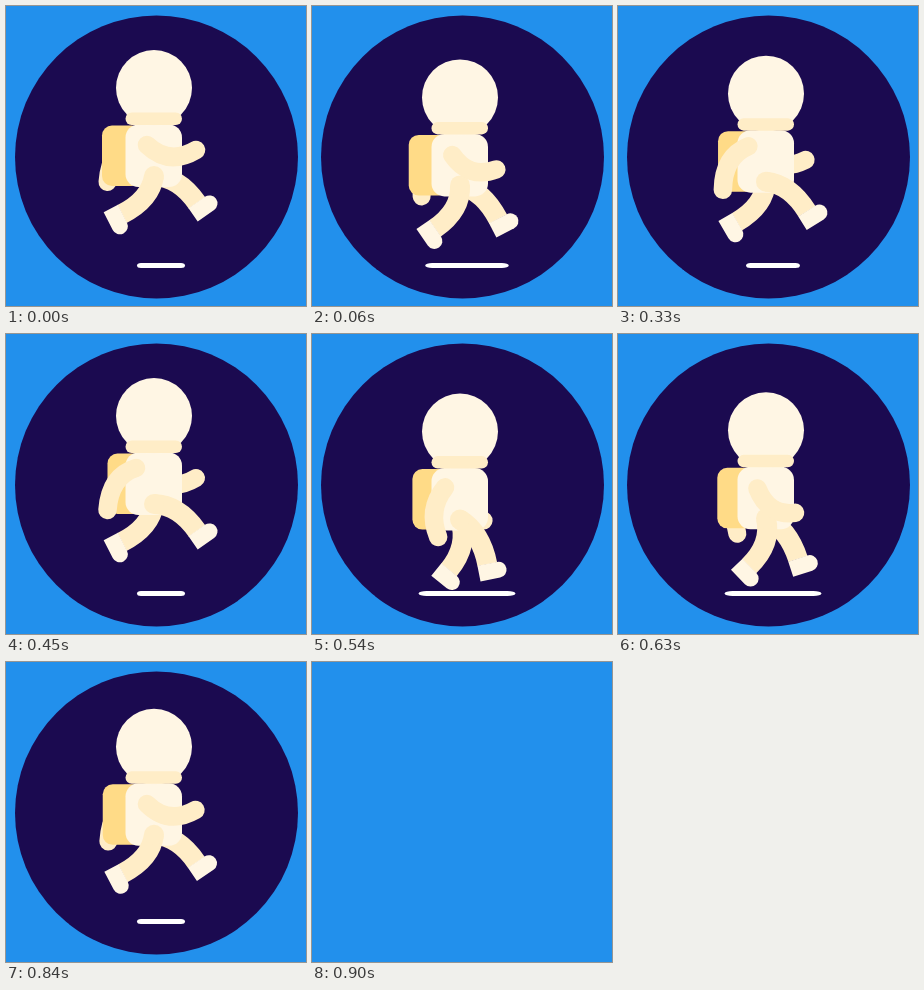
Animation, 300 px wide and 300 px high, one loop 930 ms. Source, as an HTML page:

```html
<!DOCTYPE html>
<html lang="en">
<head>
<meta charset="utf-8">
<title>Running astronaut</title>
<style>
html, body { margin: 0; width: 100%; height: 100%; overflow: hidden; background: #2290ec; }
svg { display: block; width: 100%; height: 100%; }
.limb { fill: none; stroke: #ffedc7; stroke-linecap: round; }
.leg { fill: none; stroke: #ffedc7; stroke-width: 20; }
.cloth { fill: #ffedc7; }
.suit { fill: #fff6e4; }
</style>
</head>
<body>
<svg viewBox="0 0 300 300">
  <defs>
    <path id="boot" class="suit" d="M-10 -.5V15.5H10a8 8 0 0 0 0 -16z"/>
    <circle id="hip" class="cloth" cx="148" cy="170" r="10"/>
  </defs>
  <g id="scene">
    <circle cx="150.5" cy="151" r="141.5" fill="#1b0a50"/>
    <rect id="shadow" y="257" height="5" ry="2.5" fill="#fff"/>
    <g id="runner">
      <path id="farArm" class="limb" stroke-width="18"/>
      <rect id="pack" y="119.5" width="40" height="60.5" rx="10" fill="#ffdb87"/>
      <g id="farLeg"><path class="leg"/><use href="#boot"/><use href="#hip"/></g>
      <rect class="suit" x="119.5" y="118.5" width="56.5" height="62.5" rx="13"/>
      <circle class="suit" cx="148" cy="82" r="38"/>
      <rect class="cloth" x="119.5" y="106.5" width="56.5" height="12.5" rx="6.2"/>
      <g id="nearLeg"><path class="leg"/><use href="#boot"/><use href="#hip"/></g>
      <path id="nearArm" class="limb" stroke-width="18.5"/>
    </g>
  </g>
</svg>
<script>
const STEP = 30, STRIDE = 450, LOOP = 2 * STRIDE + STEP;
const $ = id => document.getElementById(id);

// Poses at full back, passing and full front
const SHOULDER = [[130, 134], [136, 140], [141, 139]];
const ELBOW = [[104, 142], [129, 170], [163, 160]];
const HAND = [[101.5, 176], [150, 186], [190, 144]];
const ANKLE = [[116, 208], [157, 223], [191, 197]];

function smooth(x) {
  const k = Math.min(1, Math.max(0, x));
  return k * k * (3 - 2 * k);
}

// Quick kick followed by a steady drift, as an angle from 0 to PI
function phase(t, drift, kick) {
  return Math.PI * (drift * t / STRIDE + (1 - drift) * smooth(t / kick));
}

// Parabola through three poses, s from -1 (back) to 1 (front)
function pose([back, mid, front], s) {
  return mid.map((m, i) =>
    m + (front[i] - back[i]) / 2 * s + ((front[i] + back[i]) / 2 - m) * s * s);
}

function drawArm(id, s) {
  $(id).setAttribute('d', `M${pose(SHOULDER, s)}Q${pose(ELBOW, s)} ${pose(HAND, s)}`);
}

function drawLeg(id, s) {
  const [x, y] = pose(ANKLE, s);
  const angle = 14 - 49 * s;
  const r = angle * Math.PI / 180;
  const kneeX = x + 32 * Math.sin(r), kneeY = y - 32 * Math.cos(r);
  const [leg, boot] = $(id).children;
  leg.setAttribute('d', `M148 170Q${kneeX} ${kneeY} ${x} ${y}`);
  boot.setAttribute('transform', `translate(${x} ${y}) rotate(${angle})`);
}

function draw(ms) {
  const t = Math.floor(ms % LOOP / STEP) * STEP;
  const blank = t >= 2 * STRIDE;
  $('scene').style.display = blank ? 'none' : '';
  if (blank) return;

  const u = t % STRIDE;
  const side = t < STRIDE ? 1 : -1;
  const swing = side * Math.cos(phase(u, .43, 200));
  const dip = Math.sin(phase(u, .36, 220));
  const width = 48 + 49 * smooth((dip - .2) / .45);
  const turn = 1 - Math.abs(t / STRIDE - 1);

  $('runner').setAttribute('transform', `translate(0 ${19 * dip})`);
  $('pack').setAttribute('x', 96 + 5.5 * turn);
  $('shadow').setAttribute('x', 155 - width / 2);
  $('shadow').setAttribute('width', width);
  $('shadow').setAttribute('rx', width / 12);
  drawArm('nearArm', swing);
  drawArm('farArm', -swing);
  drawLeg('nearLeg', -swing);
  drawLeg('farLeg', swing);
}

const start = performance.now();
function tick() {
  draw(performance.now() - start);
  requestAnimationFrame(tick);
}
tick();
</script>
</body>
</html>
```
